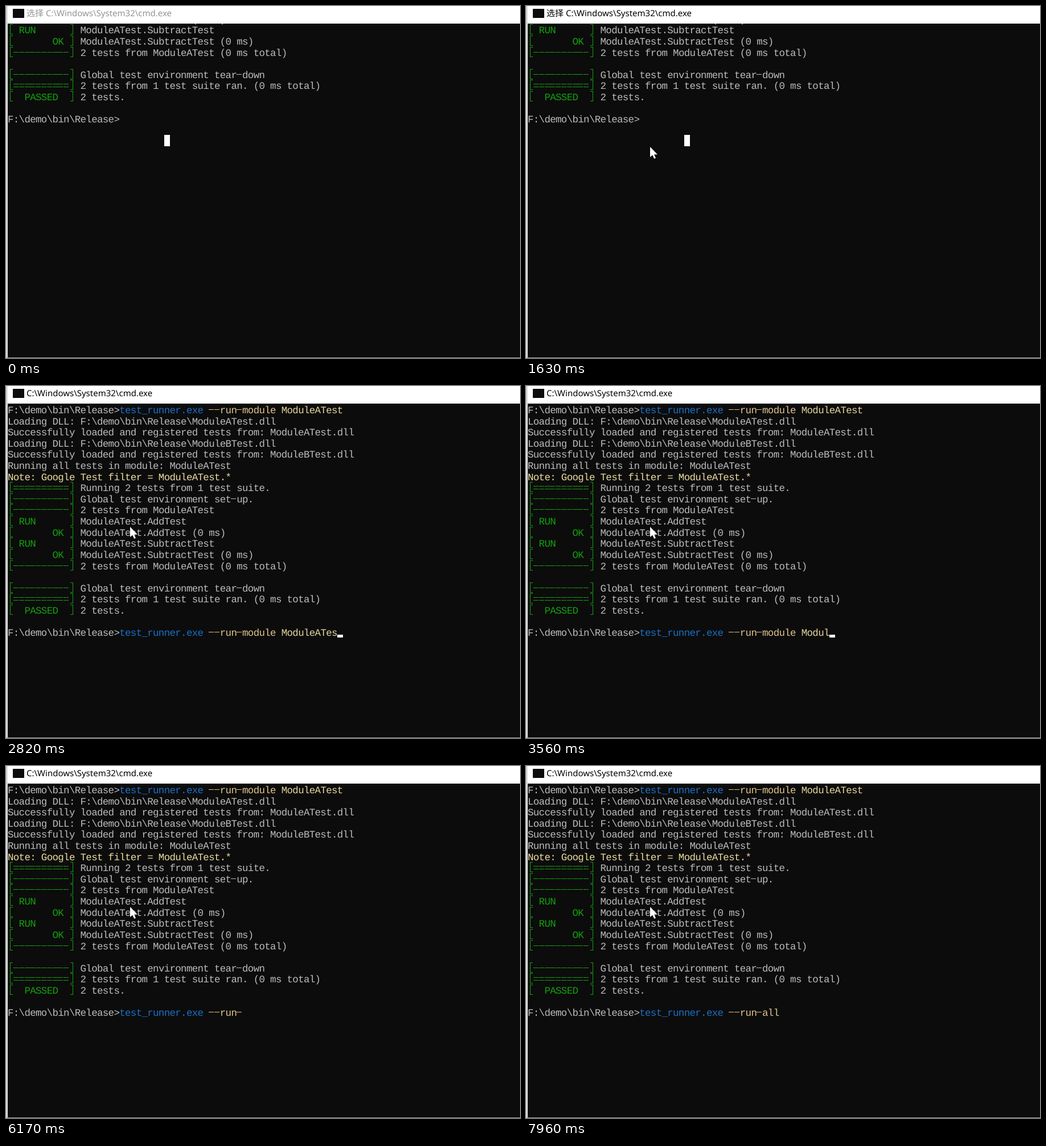
Write an HTML page that moves like this. It is 903 px wide and 620 px high and loops after 8 s.

```html
<!DOCTYPE html>
<html lang="zh">
<head>
<meta charset="utf-8">
<title>Console</title>
<style>
  html, body { margin: 0; width: 100%; height: 100%; overflow: hidden; }
  body { position: relative; background: #fff; text-rendering: geometricPrecision; }
  #stage { position: absolute; left: 0; top: 0; width: 903px; height: 620px; overflow: hidden; background: #fff; }
  #stage > *, #block, #caret { position: absolute; }
  #edge { left: 1px; top: 0; width: 1px; height: 620px; background: #a0a0a0; }
  #base { left: 1px; top: 619px; width: 902px; height: 1px; background: #a0a0a0; }
  #icon { left: 12px; top: 5px; width: 20px; height: 16px; background: #0c0c0c; }
  #title { left: 36px; top: 0; font: 15px/26px "Noto Sans", "Noto Sans CJK SC", sans-serif; white-space: pre; }
  #screen { left: 3px; top: 31px; width: 900px; height: 588px; overflow: hidden; background: #0c0c0c; }
  #text { position: absolute; left: 0; top: 4px; color: #bcbcbc; white-space: pre;
    font: 17.5px/19.62px "Liberation Mono", monospace; }
  #text div { height: 19.62px; }
  .green { color: #13a10e; }
  .note { color: #ecdca0; }
  .exe { color: #1b70c8; }
  .flag { color: #e0c48c; }
  .arg { color: #e6d6a0; }
  /* rules and brackets fill their cells like console glyphs */
  i { position: relative; font-style: normal; -webkit-text-fill-color: transparent; }
  .dash, .dbl { --rule: repeating-linear-gradient(90deg, currentColor 0 9px, transparent 9px 9.81px); }
  .dash { background: var(--rule) 0 7px / 100% 1px no-repeat; }
  .dbl { background: var(--rule) 0 5px / 100% 1px no-repeat, var(--rule) 0 10px / 100% 1px no-repeat; }
  .open::before, .close::before { content: ""; position: absolute; top: -2px; width: 4px; height: 16px; border: 1px solid; }
  .open::before { left: 4px; border-right: 0; }
  .close::before { left: 2px; border-left: 0; }
  #block, #caret { width: 10px; background: #fff; }
  #block { left: 275px; top: 196px; height: 20px; }
  #caret { height: 5px; }
  #ring { width: 29px; height: 29px; border-radius: 50%; background: rgba(255, 255, 0, .47); }
  #mouse { left: 0; top: 0; overflow: visible; }
</style>
</head>
<body>
<div id="stage">
  <div id="edge"></div>
  <div id="base"></div>
  <div id="icon"></div>
  <div id="title"></div>
  <div id="screen">
    <div id="text"></div>
    <div id="block"></div>
    <div id="caret"></div>
  </div>
  <div id="ring"></div>
  <svg id="mouse" width="14" height="22"><path d="M0 0V18.2L4.2 14.4L7.2 21L10 19.8L7.1 13.4H13Z" fill="#fff" stroke="#000" stroke-width="1" paint-order="stroke"/></svg>
</div>
<script>
const LOOP = 8000, CELL = 9.81, ROW = 19.62;
const $ = id => document.getElementById(id);
const PROMPT = 'F:\\demo\\bin\\Release>';
const EXE = 'test_runner.exe';
const FULL = EXE + ' --run-module ModuleATest';
const PATH = 'C:\\Windows\\System32\\cmd.exe';
const bar = '[----------]', dbl = '[==========]', run = '[ RUN      ]', ok = '[       OK ]';

const lines = [
  PROMPT + FULL,
  'Loading DLL: F:\\demo\\bin\\Release\\ModuleATest.dll',
  'Successfully loaded and registered tests from: ModuleATest.dll',
  'Loading DLL: F:\\demo\\bin\\Release\\ModuleBTest.dll',
  'Successfully loaded and registered tests from: ModuleBTest.dll',
  'Running all tests in module: ModuleATest',
  'Note: Google Test filter = ModuleATest.*',
  dbl + ' Running 2 tests from 1 test suite.',
  bar + ' Global test environment set-up.',
  bar + ' 2 tests from ModuleATest',
  run + ' ModuleATest.AddTest',
  ok + ' ModuleATest.AddTest (0 ms)',
  run + ' ModuleATest.SubtractTest',
  ok + ' ModuleATest.SubtractTest (0 ms)',
  bar + ' 2 tests from ModuleATest (0 ms total)',
  '',
  bar + ' Global test environment tear-down',
  dbl + ' 2 tests from 1 test suite ran. (0 ms total)',
  '[  PASSED  ]' + ' 2 tests.',
  '',
  PROMPT
];

// time, typed characters, caret visible
const keys = [
  [0, 0, 0], [1100, 0, 1], [1630, 0, 0],
  [1830, 40, 1], [2160, 40, 0], [2690, 40, 1], [2820, 39, 1], [3020, 38, 1], [3220, 38, 0],
  [3480, 36, 1], [3560, 34, 1], [3630, 32, 1], [3700, 30, 1], [3770, 28, 1], [3840, 26, 1],
  [4040, 25, 1], [4200, 24, 1], [4380, 23, 1], [4780, 23, 0],
  [4980, 22, 1], [5380, 22, 0], [5840, 22, 1], [6170, 22, 0],
  [6300, 23, 1], [6430, 24, 1], [6570, 25, 1], [6900, 25, 0], [7430, 25, 1], [7960, 25, 0]
];

const glyphs = { '-': 'dash', '=': 'dbl', '[': 'open', ']': 'close' };
const dress = s => s.replace(/-+|={2,}|[[\]]/g, m => `<i class="${glyphs[m[0]]}">${m}</i>`);
const span = (name, s) => `<span class="${name}">${dress(s)}</span>`;

function command(s) {
  const [, exe, flag, arg] = s.match(/^(\S*)( ?\S*)(.*)$/);
  return PROMPT + span('exe', exe) + span('flag', flag) + span('arg', arg);
}

function markup(s) {
  if (s.startsWith(PROMPT)) return command(s.slice(PROMPT.length));
  if (s.startsWith('Note')) return span('note', s);
  const tag = s[0] === '[' ? s.slice(0, 12) : '';
  return span('green', tag) + dress(s.slice(tag.length));
}

function fitGrid() {
  const probe = document.createElement('span');
  probe.textContent = 'M'.repeat(100);
  $('text').append(probe);
  const advance = probe.getBoundingClientRect().width / 100;
  probe.remove();
  $('text').style.letterSpacing = CELL - advance + 'px';
}

fitGrid();
$('text').innerHTML = lines.map(s => `<div>${markup(s)}</div>`).join('');
const input = $('text').lastElementChild;
const show = (id, on) => { $(id).style.visibility = on ? 'visible' : 'hidden'; };
let typed = '';

function drawMouse(t) {
  const p = Math.min(1, Math.floor((t - 70) / 80 + 1) / 7);
  const rest = (1 - p) ** 2;
  const x = 218 + 670 * rest, y = 248 + 360 * rest;
  $('mouse').style.transform = `translate(${x}px,${y}px)`;
  $('ring').style.transform = `translate(${x - 15}px,${y - 16}px)`;
  show('mouse', t >= 70);
  show('ring', t >= 550 && t < 700);
}

function draw(now) {
  const t = now % LOOP;
  const selecting = t < 1830;
  const scroll = selecting ? 12 : 0;
  const [, count, caret] = keys.findLast(k => k[0] <= t);
  const source = t < 6170 ? FULL : EXE + ' --run-all';
  const next = source.slice(0, count);
  if (next !== typed) input.innerHTML = command(typed = next);

  $('title').textContent = (selecting ? '选择 ' : '') + PATH;
  $('title').style.color = t < 550 ? '#939393' : '#000';
  $('text').style.transform = `translateY(${-Math.round(scroll * ROW)}px)`;
  $('caret').style.left = Math.round((PROMPT.length + count) * CELL) + 'px';
  $('caret').style.top = Math.round((lines.length - scroll) * ROW) - 5 + 'px';
  show('caret', caret);
  show('block', selecting);
  drawMouse(t);
  requestAnimationFrame(() => draw(performance.now()));
}
draw(performance.now());
</script>
</body>
</html>
```
